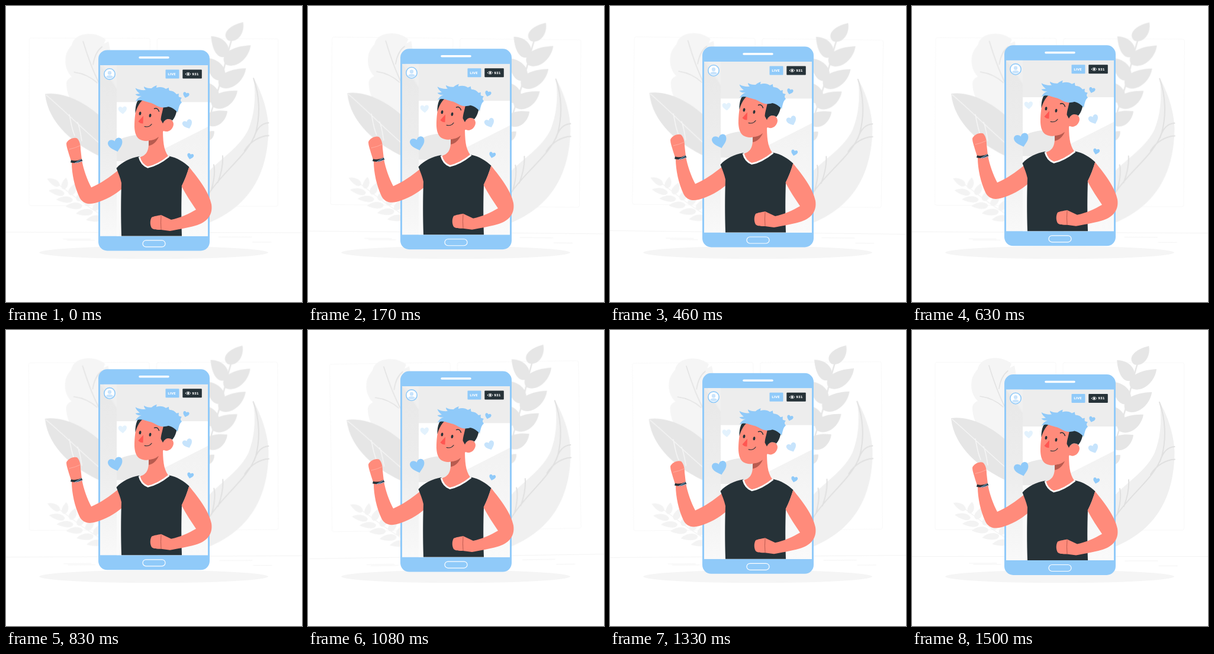
An HTML page for the animation above (1.54 s loop, 500 by 500 pixels).

```html
<!DOCTYPE html>
<html lang="en">
<head>
<meta charset="utf-8">
<title>Live stream</title>
<style>
  html, body { margin: 0; width: 100%; height: 100%; overflow: hidden; background: #fff; }
  svg { display: block; width: 100vw; height: 100vh; }
  .loop { animation: 1540ms linear -40ms infinite; }
  .float { animation-name: float; }
  .wind { animation-name: wind; }
  #room { transform-origin: 250px 227px; }
  #plants { transform-origin: 255px 196px; }
  @keyframes float {
    0%, 100% { transform: translateY(.5px); }
    50% { transform: translateY(-9.5px); }
  }
  @keyframes wind {
    0%, 100% { transform: rotate(0deg); }
    25% { transform: rotate(1deg); }
    75% { transform: rotate(-1deg); }
  }
  .line { fill: none; stroke-linecap: round; stroke-linejoin: round; }
  .flat { stroke-linecap: butt; }
  .blue { fill: #90caf9; }
  .dark { fill: #263238; }
  .skin { fill: #ff8b7b; }
  text { font: 700 5.4px "DejaVu Sans", sans-serif; fill: #fff; }
</style>
</head>
<body>
<svg viewBox="0 0 500 500">
  <defs>
    <path id="leaf" d="M0 0C1-18 20-17 40 0C28 16 6 17 0 0Z"/>
    <path id="heart" d="M0 12C-4 8-13 3-13-5C-13-12-4-14 0-7C4-14 13-12 13-5C13 3 4 8 0 12Z"/>
    <clipPath id="screen"><rect x="159" y="100" width="182" height="288.5"/></clipPath>
    <linearGradient id="side" x2="0" y2="1">
      <stop stop-color="#e8e8e8"/><stop offset=".5" stop-color="#ededed"/><stop offset="1" stop-color="#f9f9f9"/>
    </linearGradient>
    <linearGradient id="wall" x2="0" y2="1">
      <stop stop-color="#f2f2f2"/><stop offset="1" stop-color="#fafafa"/>
    </linearGradient>
  </defs>

  <g id="room" class="loop wind line" stroke="#f7f7f7" stroke-width=".8">
    <rect x="39" y="54.500" width="204" height="283" rx="3"/>
    <rect x="255" y="55" width="204.500" height="283" rx="3"/>
    <path stroke="#f0f0f0" d="M0 382.500H500M97 394H143M360 390H415M417 398.500H448M104 396H150"/>
  </g>

  <g id="plants" class="loop wind">
    <path fill="#f5f5f5" d="M173 60L165 64L168 57C156 47 139 45 125 50C116 54 112 60 111 66C106 72 101 79 100.500 88C99 101 103 112 111 120C106 122 102 126 102 131C102 146 108 161 117 168C129 178 146 187 165 194L190 150Z"/>
    <path class="line" stroke="#e3e3e3" stroke-width="1.600" d="M130 60C138 86 147 112 160 136M115 112C130 114 143 120 154 130M162 69C153 76 149 86 147 99"/>

    <path fill="#e6e6e6" d="M66 149C94 145 131 160 163 190V256C116 235 71 199 66 149Z"/>
    <path class="line" stroke="#f5f5f5" stroke-width="1.600" d="M68 151C91 170 121 200 160 234M107 184C110 198 111 208 116 219M121 197C126 210 126 218 128 228"/>

    <g fill="#f3f3f3">
      <path class="line" stroke="#f3f3f3" stroke-width="1.500" d="M86 300C108 315 130 335 160 352"/>
      <use href="#leaf" transform="translate(91 303) rotate(207) scale(.6 .42)"/>
      <use href="#leaf" transform="translate(98 310) rotate(-80) scale(.5 .42)"/>
      <use href="#leaf" transform="translate(99 317) rotate(190) scale(.68 .42)"/>
      <use href="#leaf" transform="translate(109 320) rotate(-68) scale(.53 .46)"/>
      <use href="#leaf" transform="translate(113 327) rotate(179) scale(.7 .42)"/>
      <use href="#leaf" transform="translate(122 330) rotate(-65) scale(.52 .46)"/>
      <use href="#leaf" transform="translate(129 337) rotate(176) scale(.7 .44)"/>
      <use href="#leaf" transform="translate(136 338) rotate(-60) scale(.55 .46)"/>
      <use href="#leaf" transform="translate(147 347) rotate(172) scale(.72 .44)"/>
      <use href="#leaf" transform="translate(149 346) rotate(-55) scale(.6 .46)"/>
      <use href="#leaf" transform="translate(163 357) rotate(170) scale(.7 .44)"/>
    </g>

    <g fill="#e6e6e6">
      <path class="line" stroke="#e6e6e6" stroke-width="2.500" d="M386 42C374 72 368 113 355 152C350 170 343 188 333 224"/>
      <use href="#leaf" transform="translate(375 58) rotate(-51) scale(1 .9)"/>
      <use href="#leaf" transform="translate(374 83) rotate(-131) scale(1.060 .95)"/>
      <use href="#leaf" transform="translate(370 98) rotate(-36.500) scale(1.340 1.060)"/>
      <use href="#leaf" transform="translate(368 122) rotate(-132) scale(1.150 1)"/>
      <use href="#leaf" transform="translate(361 136) rotate(-35) scale(1.350 1.060)"/>
      <use href="#leaf" transform="translate(358 160) rotate(-133) scale(1.100 1)"/>
      <use href="#leaf" transform="translate(349 170) rotate(-33) scale(1.250 1.040)"/>
      <use href="#leaf" transform="translate(338 199) rotate(-31) scale(1.050 1)"/>
      <use href="#leaf" transform="translate(334 226) rotate(-40) scale(.58 .6)"/>
    </g>

    <path fill="#f0f0f0" d="M418 121C432 145 443 178 443.500 206C443 275 418 336 341 367V281C363 257 396 238 410 207C419 184 423 155 418 121Z"/>
    <path class="line" stroke="#e0e0e0" stroke-width="2" d="M418 122C428 150 430 183 422 213C410 251 366 279 342 318M443.500 197C431 198 424 206 419 222M444 218.500C430 219 413 228 403 244M366 253C367 268 364 282 358 298M351 268C354 280 352 293 347 311"/>
  </g>

  <ellipse cx="249.500" cy="416.500" rx="193.500" ry="10.700" fill="#f5f5f5"/>

  <g class="loop float">
    <rect class="blue" x="156" y="74.500" width="188" height="339" rx="15"/>
    <g clip-path="url(#screen)">
      <path fill="#fafafa" d="M159 100H341V389H159Z"/>
      <path fill="#ededed" d="M159 100H341V162.500H187Z"/>
      <path fill="#fff" d="M187 162.500H341V389H187Z"/>
      <path fill="url(#side)" d="M159 100L187 140V389H159Z"/>
      <path fill="#f0f0f0" d="M165 100H187V138Z"/>
      <path fill="url(#wall)" d="M341 204L256 247V389H341Z"/>
      <path fill="#e9e9e9" d="M187 229C198 221 215 217 232 218L250 230V262H187Z"/>
      <path fill="#fafafa" d="M187 262H230V389H187Z"/>
    </g>
    <path class="line" stroke="#fff" stroke-width="3.500" d="M226 87H274"/>
    <rect class="line" x="231" y="396" width="38" height="11" rx="5.500" stroke="#fff" stroke-width="1.200"/>

    <circle cx="175" cy="115" r="9.200" fill="#fff" stroke="#90caf9" stroke-width="1.600"/>
    <g fill="#c9e4fc">
      <circle cx="175" cy="113" r="3.200"/>
      <path d="M169 120C170 116 180 116 181 120C178 123 172 123 169 120Z"/>
    </g>

    <rect class="blue" x="269.500" y="107.500" width="23" height="15" rx="1"/>
    <text x="273.300" y="117">LIVE</text>
    <rect class="dark" x="298.300" y="107.500" width="32.500" height="15" rx="1"/>
    <path class="line" stroke="#fff" stroke-width=".8" d="M303.300 115Q307.700 109.800 312 115Q307.700 120 303.300 115Z"/>
    <circle cx="307.700" cy="115" r="1.700" fill="#fff"/>
    <text x="314.300" y="117">931</text>

    <g fill="#90caf9">
      <use href="#heart" transform="translate(185.500 235) rotate(-16) scale(.95)"/>
      <use href="#heart" transform="translate(304 150.500) rotate(16) scale(.4)"/>
      <use href="#heart" transform="translate(311.300 254) rotate(14) scale(.42)"/>
      <use href="#heart" fill="#c7e4fc" transform="translate(307 200) rotate(-22) scale(.64)"/>
      <use href="#heart" fill="#e3f2fd" transform="translate(197 176) rotate(-4) scale(.55)"/>
    </g>

    <!-- raised arm -->
    <path class="skin" d="M190 277C175 289 160 300 144 306.500C137 293 131 277 128 260L126 242C126 234 124 227 120 223.500C114 221 104 226 102 232C102 238 105 245 106.500 251L111 265C111 283 116 306 124 323C129 333 138 336 150 333C168 328 184 319 198 307Z"/>
    <path class="line" stroke="#ffb3a8" stroke-width=".8" d="M107 242Q117 240 125 236"/>
    <path class="line flat" stroke="#263238" stroke-width="4" d="M109.500 262.300Q119 265 128.500 260"/>
    <path class="line" stroke="#90caf9" stroke-width=".9" d="M116 265.500L127 259.200M120 265L128 262"/>

    <path class="dark" d="M186.500 274C196 263 210 257 225 254L239 272L275 253.500C289 256 301 264 309.500 272C306 283 302 294 297 304C296 330 296 360 297 388.500H195C194 360 194 328 195 299C193 290 190 283 186.500 274Z"/>

    <!-- bent arm -->
    <path class="skin" d="M309.200 272C326 292 343 315 347 335C350 354 338 366 320 371C306 375 288 378 277 380L262 378C255 378 249 378 246 375C243 370 243 362 246 357C250 355 257 354 262 353L279 361C294 358 309 351 321 344C313 332 304 319 296.500 304.500C302 294 306 283 309.200 272Z"/>
    <path class="line" stroke="#a94f46" stroke-width=".8" d="M262 354Q261 366 262 377.500"/>

    <path class="skin" d="M265 206C265 227 266 243 274 253.500C264 262 252 269 239.500 272C232 268 228 262 226 255.500C237 252 242 246 241 225Z"/>
    <path class="line flat" stroke="#fff" stroke-width="2.800" d="M225 254.800C227 263 232 269.500 239.500 272.500C252 270 264 263 275.500 253.800"/>
    <path fill="#b85b4f" d="M241 227C249 227 254 224 258 221C254 230 248 235 241 236Z"/>

    <!-- head -->
    <path class="skin" d="M229 156C219 165 217 188 217 205C218 222 225 228 238 228C250 227 260 220 266 211C274 215 283 208 283 199C282 190 271 188 266 196L268 164Z"/>
    <path class="dark" d="M231 152C222 156 218 167 218.500 181C221 173 224 164 233 157ZM267 164L288.500 176C287 185 284 190 281 193.500C275 189 268 191 265 198.500L261.500 192C262 184 265 177 267 164Z"/>
    <path class="blue" d="M219 161C221 157 224 154 229 152C225 153 221 152 218.500 149L226 148C222 145 219.500 142 218.500 138.500C224 142 231 142.500 236 142C234 140 233 138 233 136C238 139 242 139 246 139C248 137 251 135 255 134C254 136 254 137 254 138C260 136 266 137 270 140L275 138C275 140 275 141 276 143C281 143 285 145 288 149L292 148C291.500 150 291.500 152 292 153.500L297 155C295 157 295 158 295 160L297 163C293 166 292 171 290 180C286 175 280 171 274 170C266 173 258 171 252 167C246 163 240 163 232 160C228 159 224 159 219 161Z"/>
    <g class="dark">
      <ellipse cx="226.500" cy="181.500" rx="1.900" ry="3" transform="rotate(8 226.500 181.500)"/>
      <ellipse cx="243.500" cy="185" rx="1.900" ry="3" transform="rotate(8 243.500 185)"/>
    </g>
    <path class="line" stroke="#263238" stroke-width="1.500" d="M250.500 173.500Q256 171 258.500 178"/>
    <path class="line" stroke="#263238" stroke-width="1.100" d="M234 203.500Q242 205.500 246 199.500"/>
    <path fill="#ff5652" d="M232 185.500L223.500 195Q227 199 231.500 198.500Z"/>
  </g>
</svg>
</body>
</html>
```
